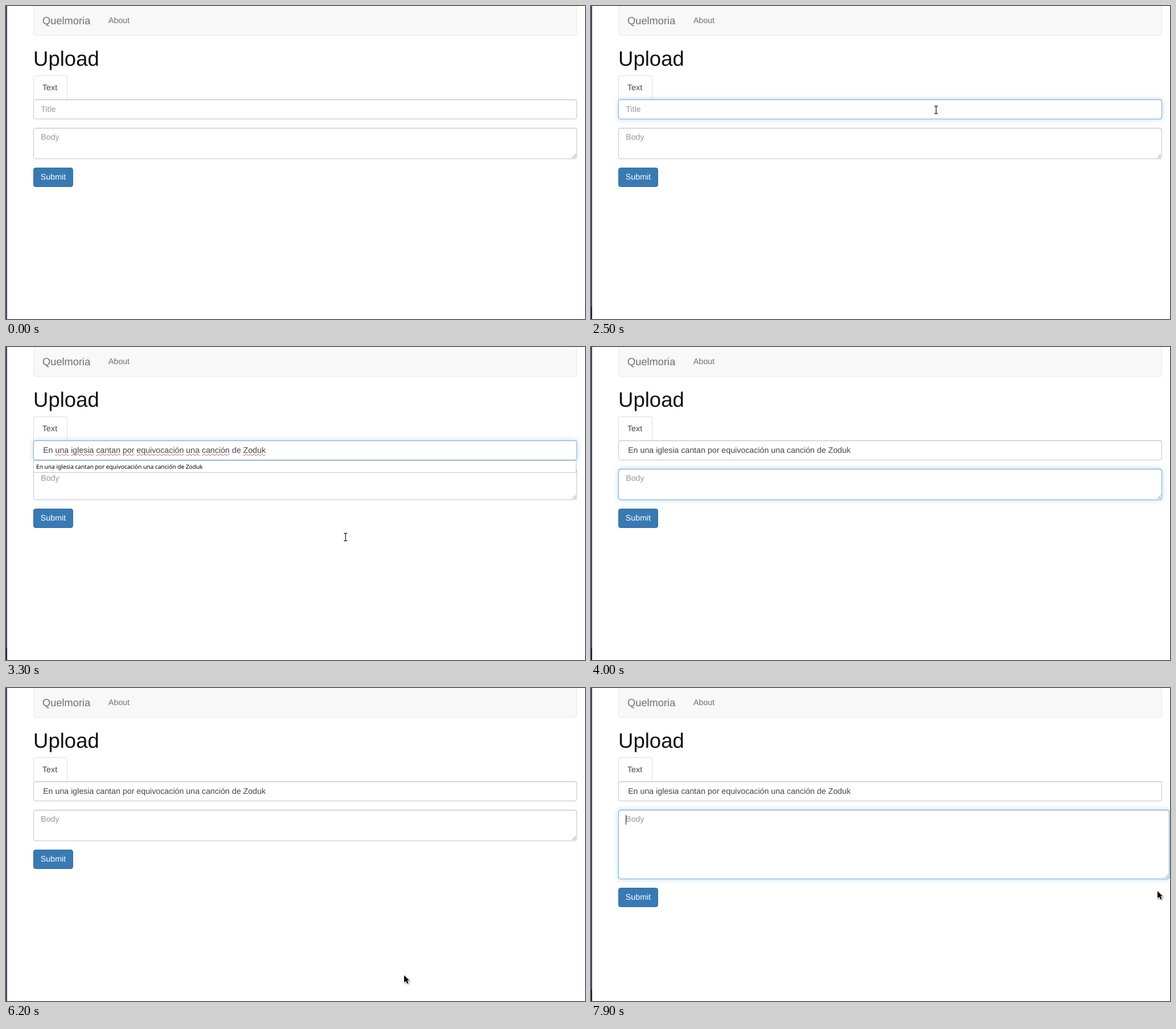
An HTML page for the animation above (8000 ms loop, 1018 by 550 pixels).

```html
<!DOCTYPE html>
<html lang="en">
<head>
<meta charset="utf-8">
<title>Upload</title>
<style>
  html, body { margin: 0; width: 100%; height: 100%; overflow: hidden; background: #fff; }
  body {
    position: relative; color: #444; text-rendering: geometricPrecision;
    font: 14.22px/20px "Liberation Sans", Arial, sans-serif;
  }
  body * { box-sizing: border-box; }
  body > *, .abs { position: absolute; white-space: pre; }
  #strip { left: 0; top: 0; width: 2px; height: 550px; background: #3b4a68; }
  #stripEnd { left: 0; top: 529px; width: 2px; height: 21px; background: #1b1b3c; }
  #navbar {
    left: 48px; top: -1px; width: 956px; height: 53px;
    background: #f8f8f8; border: 1px solid #e7e7e7; border-radius: 4px; color: #6f6f6f;
  }
  #brand { left: 15px; top: 15.5px; font-size: 18.29px; }
  #about { left: 131px; top: 16px; }
  h1 { left: 48px; top: 73px; margin: 0; font-size: 36.57px; font-weight: 400; line-height: 40px; color: #111; }
  #rule { left: 48px; top: 164px; width: 956px; height: 1px; background: #ddd; }
  #tab {
    left: 48px; top: 122px; width: 60px; height: 43px; padding: 11px 15px;
    background: #fff; border: 1px solid #ddd; border-bottom: 0; border-radius: 4px 4px 0 0;
  }
  .field {
    left: 48px; width: 956px; padding: 6px 12.2px; background: #fff;
    border: 1px solid #c4c4c4; border-radius: 4px; box-shadow: inset 0 1px 1px #00000013;
  }
  .field::after {
    content: ""; position: absolute; inset: -1px; opacity: var(--glow, 0);
    border: 1px solid #78b0da; border-radius: 4px; box-shadow: 0 0 8px #66afe980;
  }
  #title { top: 164px; height: 35px; padding-top: 7px; }
  #body { top: 214px; height: 55px; }
  .hint { color: #999; }
  .spell u { text-decoration: underline wavy #dd3b3b 1px; text-underline-offset: 1px; text-decoration-skip-ink: none; }
  u { text-decoration: none; }
  #caret { left: 12px; top: 8px; width: 1px; height: 17px; background: #222; }
  #grip { right: 0; bottom: 0; }
  #suggest {
    left: 48px; top: 199px; width: 955px; height: 22px; padding-left: 4px;
    background: #fff; border: 1px solid #c4c4c4; color: #000;
    font: 500 10.16px/20px "Noto Sans", "Open Sans", sans-serif;
  }
  #submit {
    left: 48px; top: 284px; width: 70px; height: 34px; line-height: 32px; text-align: center;
    color: #fff; background: #387ab4; border: 1px solid #2e6da4; border-radius: 4px;
  }
  #arrow, #beam { left: 0; top: 0; overflow: visible; }
</style>
</head>
<body>
  <div id="strip"></div><div id="stripEnd"></div>
  <div id="navbar"><span id="brand" class="abs">Quelmoria</span><span id="about" class="abs">About</span></div>
  <h1>Upload</h1>
  <div id="rule"></div>
  <div id="tab">Text</div>
  <div id="title" class="field"><span id="titleHint" class="hint">Title</span><span id="titleText"> En <u>una</u> <u>iglesia</u> <u>cantan</u> <u>por</u> <u>equivocación</u> <u>una</u> <u>canción</u> de <u>Zoduk</u></span></div>
  <div id="body" class="field"><span class="hint">Body</span><i id="caret" class="abs"></i><svg id="grip" class="abs" width="8" height="8"><path d="M1 7L7 1M4.500 7L7 4.500" stroke="#777"/></svg></div>
  <div id="suggest">En una iglesia cantan por equivocación una canción de Zoduk</div>
  <div id="submit">Submit</div>
  <svg id="beam" width="9" height="15"><path d="M-3 -6.500H-1L0 -6L1 -6.500H3M0 -6V6M-3 6.500H-1L0 6L1 6.500H3" fill="none" stroke="#222" stroke-width="1.300"/></svg>
  <svg id="arrow" width="12" height="17"><path d="M0 0V12.500L3 9.800L5.200 14.500L7.500 13.400L5.300 8.900H9.200Z" stroke="#fff" stroke-width="1.600" paint-order="stroke" style="filter:drop-shadow(1px 1px 1px #0006)"/></svg>
<script>
const LOOP = 8000, STEP = 100;
const el = id => document.getElementById(id);

// Pointer strokes as [time, x, y]; the pointer is hidden between strokes.
const beamStrokes = [
  [[2000, 570, 540], [2400, 605, 182], [2800, 612, 184], [3100, 603, 251], [3300, 597, 334], [3500, 601, 243], [3700, 601, 243]],
];
const arrowStrokes = [
  [[6100, 649, 538], [6200, 700, 505], [6300, 731, 470], [6400, 796, 320], [6500, 922, 291]],
  [[6900, 1007, 274], [7000, 1003, 263], [7100, 1001, 259], [7400, 1001, 259], [7700, 1014, 327], [7900, 996, 357]],
];

const ramp = (t, from, to) => Math.min(1, Math.max(0, (t - from) / (to - from)));
const during = (t, from, to) => t >= from && t < to;
const show = (id, on) => { el(id).style.display = on ? "" : "none"; };

function pointAt(stroke, t) {
  const i = Math.max(1, stroke.findIndex(key => key[0] >= t));
  const [t0, x0, y0] = stroke[i - 1], [t1, x1, y1] = stroke[i];
  const k = ramp(t, t0, t1);
  return [x0 + (x1 - x0) * k, y0 + (y1 - y0) * k];
}

function movePointer(id, strokes, t) {
  const stroke = strokes.find(s => t >= s[0][0] && t <= s.at(-1)[0]);
  show(id, stroke);
  if (!stroke) return;
  const [x, y] = pointAt(stroke, t);
  el(id).style.transform = `translate(${x}px, ${y}px)`;
}

function draw(t) {
  const filled = t >= 2700, titleFocused = during(t, 2400, 3500);
  show("titleHint", !filled);
  show("titleText", filled);
  el("titleText").className = titleFocused ? "spell" : "";
  show("suggest", during(t, 2700, 3500));
  show("caret", t >= 7700);
  show("stripEnd", during(t, 2000, 4200) || t >= 7500);

  el("title").style.setProperty("--glow", ramp(t, 2300, 2500) - ramp(t, 3400, 3600));
  el("body").style.setProperty("--glow", ramp(t, 3500, 3700) - ramp(t, 4300, 4500) + ramp(t, 7300, 7500));

  const drag = ramp(t, 7400, 7700);
  el("body").style.width = Math.round(956 + 13 * drag) + "px";
  el("body").style.height = Math.round(55 + 67 * drag) + "px";
  el("submit").style.top = Math.round(284 + 67 * drag) + "px";

  movePointer("beam", beamStrokes, t);
  movePointer("arrow", arrowStrokes, t);
}

const start = performance.now();
function tick() {
  const t = (performance.now() - start) % LOOP;
  draw(Math.floor(t / STEP) * STEP);
  requestAnimationFrame(tick);
}
tick();
</script>
</body>
</html>
```
